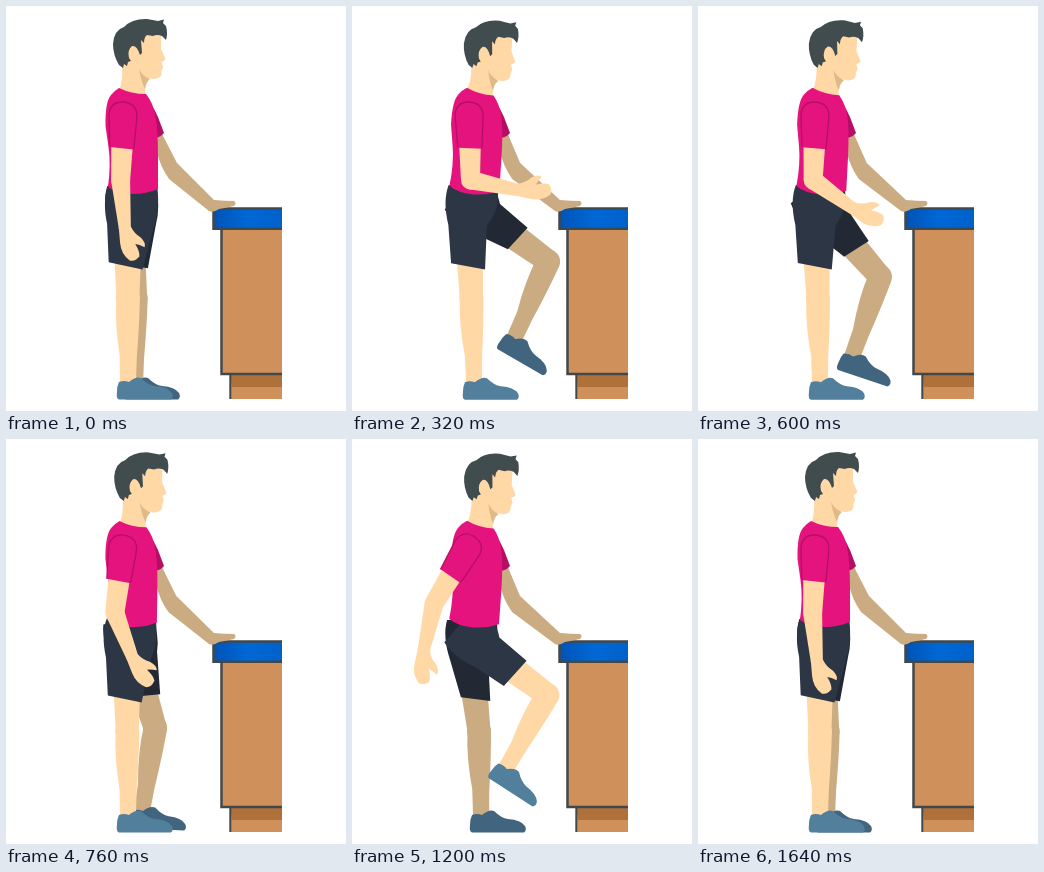
Animation of 340 by 405 pixels, one loop 1.68 s. Source, as an HTML page with a canvas:

```html
<!DOCTYPE html>
<html lang="en">
<head>
<meta charset="utf-8">
<title>Marching at the counter</title>
<style>
  html, body { margin: 0; width: 100%; height: 100%; overflow: hidden; background: #fff; }
  canvas { display: block; width: 340px; height: 405px; }
</style>
</head>
<body>
<canvas id="stage" width="340" height="405"></canvas>
<script>
const ctx = document.getElementById('stage').getContext('2d');
const LOOP = 1680, TICK = 40, STEP = 820;
const RAD = Math.PI / 180;
const THIGH = 97, SHIN = 84, UPPER_ARM = 68, FOREARM = 49;
const PIVOT = [118, 112], HIP = [125, 195], SHOULDER = [117, 106];
const LEAN = 4;

const NEAR = { skin: '#ffd8a6', shorts: '#2d3645', shoe: '#527f9c', ankle: [122, 376], bow: -2, hemBack: -20 };
const FAR = { skin: '#cbab82', shorts: '#222935', shoe: '#41657e', ankle: [129, 376], bow: 2, hemBack: -15 };
const SHIRT = '#e5137e', SHIRT_DARK = '#b50f65', HAIR = '#414c4e', LINE = '#41484c';
const WOOD = '#d0905b', WOOD_DARK = '#b0703a';

// Joint curves as [phase, degrees]; legs use one step, the arm uses both.
const FAR_LIFT = {
  thigh: [[0, 0], [.195, 27.5], [.5, 57], [.54, 56], [.927, 12], [1, 0]],
  shin: [[0, 0], [.195, -13], [.5, -31], [.54, -30], [.927, -9], [1, 0]],
  foot: [[0, 0], [.195, 17], [.5, 32], [.927, 3], [1, 0]]
};
const NEAR_LIFT = {
  thigh: [[0, 0], [.22, 30], [.5, 53], [.66, 43], [1, 0]],
  shin: [[0, 0], [.22, -30], [.5, -31], [.66, -27], [1, 0]],
  foot: [[0, 0], [.22, 33], [.5, 32], [.66, 24], [1, 0]]
};
const ARM = {
  upper: [[0, -2], [.2, 0], [.54, 1], [.93, -7], [1.22, -24.5], [1.5, -31], [1.66, -25.5], [2, -2]],
  fore: [[0, 5], [.2, 42], [.5, 86], [.93, 21], [1.22, 10], [1.5, -14], [1.66, 1], [2, 5]]
};

const path = d => new Path2D(d);
const SHAPES = {
  thigh: path('M-15 50H12V97H-11Z'),
  shin: path('M-11 0Q-13 26 -8 58V86H8L9 60Q12 24 12.5 0Z'),
  shoe: path('M-9 0Q-4 -2 1 0Q8 -6 13 -4Q20 3 27 4Q40 5 44 11Q46 15 43 17.5H-9Q-12 17 -11 10Q-11 4 -9 0Z'),
  sleeve: path('M-12 35.5L-14 3Q-13 -10 0 -10Q14 -9 14 4Q14 8 12 37Z'),
  sleeveEdge: path('M-12 35.5L-14 3Q-13 -10 0 -10Q14 -9 14 4Q14 8 12 37'),
  upperArm: path('M-10.5 34H11L9.5 68H-9.5Z'),
  forearm: path('M-9.5 0L-6 49H6L9.5 0Z'),
  hand: path('M-6 -2H6Q9 6 15 10Q20 16 18 20Q13 17 9 16Q13 24 12 29Q7 34 2 32Q-6 25 -6 14Z'),
  face: path('M113 84Q117 77 116 58L122 36L140 24L155 29L155 43L159.5 53Q158.5 55 155.5 56L157 61L155.5 65Q156 71 152 72Q147 74 143 72Q139 78 139 89L127 91Z'),
  neckShade: path('M133 63Q136 70 144 73Q140 76 139 83Q135 75 133 63Z'),
  hair: path('M117 62L113 59Q107 49 107 38Q108 24 118 21Q126 12.5 141 13L152 15L158 13.5L157 17L160 20Q162 28 160 34L156 30Q151 28 147 30L141 29Q138 31 138 37L135 34L136 47L134 49Q131 39 126 40Q121 44 123 52L125 55L122 56L121 60L118 58Z'),
  shirt: path('M113 82Q125 88 140 88Q147 97 149 108Q152 122 152 150V183Q140 188 127 188Q111 188 102 181Q105 158 102.5 141L99.5 120Q99 96 105 89Q108 85 113 82Z'),
  farSleeve: path('M143 96Q149 103 152 111L158 127Q155 131 149 132Z')
};

function fill(shape, color) {
  ctx.fillStyle = color;
  ctx.fill(shape);
}

function circle(x, y, r, color) {
  ctx.fillStyle = color;
  ctx.beginPath();
  ctx.arc(x, y, r, 0, 2 * Math.PI);
  ctx.fill();
}

function outline(d, width = 2.5) {
  ctx.strokeStyle = LINE;
  ctx.lineWidth = width;
  ctx.stroke(path(d));
}

function placed(x, y, degrees, draw) {
  ctx.save();
  ctx.translate(x, y);
  ctx.rotate(degrees * RAD);
  draw();
  ctx.restore();
}

// Smooth interpolation through the keys, with slopes taken from the neighbours.
function curve(keys, u) {
  const last = keys.length - 1;
  let i = 0;
  while (i < last - 1 && u > keys[i + 1][0]) i++;
  const slope = k => {
    const a = keys[Math.max(k - 1, 0)], b = keys[Math.min(k + 1, last)];
    return (b[1] - a[1]) / (b[0] - a[0]);
  };
  const [u0, v0] = keys[i], [u1, v1] = keys[i + 1];
  const w = u1 - u0, p = (u - u0) / w, q = 1 - p;
  return q * q * (1 + 2 * p) * v0 + p * p * (3 - 2 * p) * v1
    + w * p * q * (q * slope(i) - p * slope(i + 1));
}

function leaned([x, y], degrees) {
  const c = Math.cos(degrees * RAD), s = Math.sin(degrees * RAD);
  const dx = x - PIVOT[0], dy = y - PIVOT[1];
  return [PIVOT[0] + dx * c - dy * s, PIVOT[1] + dx * s + dy * c];
}

// Angles are measured from straight down, positive towards the counter.
const along = ([x, y], degrees, length) =>
  [x + Math.sin(degrees * RAD) * length, y + Math.cos(degrees * RAD) * length];
const aim = (a, b) => Math.atan2(b[0] - a[0], b[1] - a[1]) / RAD;

function drawCounter() {
  ctx.fillStyle = WOOD;
  ctx.fillRect(224, 368, 52, 25);
  fill(path('M224 368H276V381H226Z'), WOOD_DARK);
  outline('M224.3 368V393', 2);
  ctx.fillStyle = WOOD;
  ctx.fillRect(216, 223, 60, 145);
  outline('M276 368H215.5V223');
  const blue = ctx.createLinearGradient(207, 0, 276, 0);
  blue.addColorStop(0, '#0053b5');
  blue.addColorStop(.5, '#0068d6');
  blue.addColorStop(1, '#0061ca');
  ctx.fillStyle = blue;
  ctx.fillRect(207, 202, 69, 21);
  outline('M276 202.5H207.5V222.7H276');
}

function drawFarArm(sway) {
  const e = -3 * sway;
  fill(path(`M148 126L155 126L${171 + e} 157L208 194Q219 195 228 195Q231 197 228 200Q219 202 213 203Q207 207 203 205L${163 + e} 173Q${154 + e} 160 ${151 + e} 146Z`), FAR.skin);
  fill(SHAPES.farSleeve, SHIRT_DARK);
}

function drawLeg(leg, hip, lift, u, sway) {
  const rest = [
    hip[0] + (leg.ankle[0] - hip[0]) * .53 + leg.bow,
    hip[1] + (leg.ankle[1] - hip[1]) * .53
  ];
  const raised = curve(lift.thigh, u);
  const thighAngle = aim(hip, rest) + raised;
  const shinAngle = aim(rest, leg.ankle) + curve(lift.shin, u);
  const knee = along(hip, thighAngle, THIGH);
  const ankle = along(knee, shinAngle, SHIN);
  const bulge = 24 - 9 * sway;
  const back = 62 - .08 * raised, front = 68 - .16 * raised;

  placed(...hip, -thighAngle, () => fill(SHAPES.thigh, leg.skin));
  circle(knee[0] + .5, knee[1], 12, leg.skin);
  placed(...knee, -shinAngle, () => fill(SHAPES.shin, leg.skin));
  placed(...ankle, curve(lift.foot, u), () => fill(SHAPES.shoe, leg.shoe));
  placed(...hip, -thighAngle, () => fill(
    path(`M-23 -16Q-29 0 -23 24L${leg.hemBack} ${back}L14 ${front}L${bulge} 24Q29 8 26 -14Z`), leg.shorts));
}

function drawUpperBody(lean) {
  ctx.save();
  ctx.translate(...PIVOT);
  ctx.rotate(lean * RAD);
  ctx.translate(-PIVOT[0], -PIVOT[1]);
  fill(SHAPES.face, NEAR.skin);
  fill(SHAPES.neckShade, '#dfba89');
  fill(SHAPES.shirt, SHIRT);
  fill(SHAPES.hair, HAIR);
  ctx.restore();
}

function drawNearArm(phase) {
  const upper = curve(ARM.upper, phase), fore = curve(ARM.fore, phase);
  const elbow = along(SHOULDER, upper, UPPER_ARM);
  const wrist = along(elbow, fore, FOREARM);
  placed(...SHOULDER, -upper, () => fill(SHAPES.upperArm, NEAR.skin));
  circle(...elbow, 9.5, NEAR.skin);
  placed(...elbow, -fore, () => fill(SHAPES.forearm, NEAR.skin));
  placed(...wrist, -fore, () => fill(SHAPES.hand, NEAR.skin));
  placed(...SHOULDER, -upper, () => {
    fill(SHAPES.sleeve, SHIRT);
    ctx.strokeStyle = SHIRT_DARK;
    ctx.lineWidth = 1.3;
    ctx.stroke(SHAPES.sleeveEdge);
  });
}

function drawScene(ms) {
  const phase = (ms / STEP) % 2;
  const u = phase % 1;
  const sway = Math.sin(Math.PI * u);
  const lean = LEAN * sway;
  const hip = leaned(HIP, lean);

  ctx.fillStyle = '#fff';
  ctx.fillRect(0, 0, 340, 405);
  drawCounter();
  drawFarArm(sway);
  drawLeg(FAR, hip, FAR_LIFT, phase < 1 ? u : 0, sway);
  drawLeg(NEAR, hip, NEAR_LIFT, phase < 1 ? 0 : u, sway);
  drawUpperBody(lean);
  drawNearArm(phase);
}

let start;
function tick(now) {
  start ??= now;
  const ms = Math.max(0, now - start) % LOOP;
  drawScene(Math.floor(ms / TICK) * TICK);
  requestAnimationFrame(tick);
}
drawScene(0);
requestAnimationFrame(tick);
</script>
</body>
</html>
```
